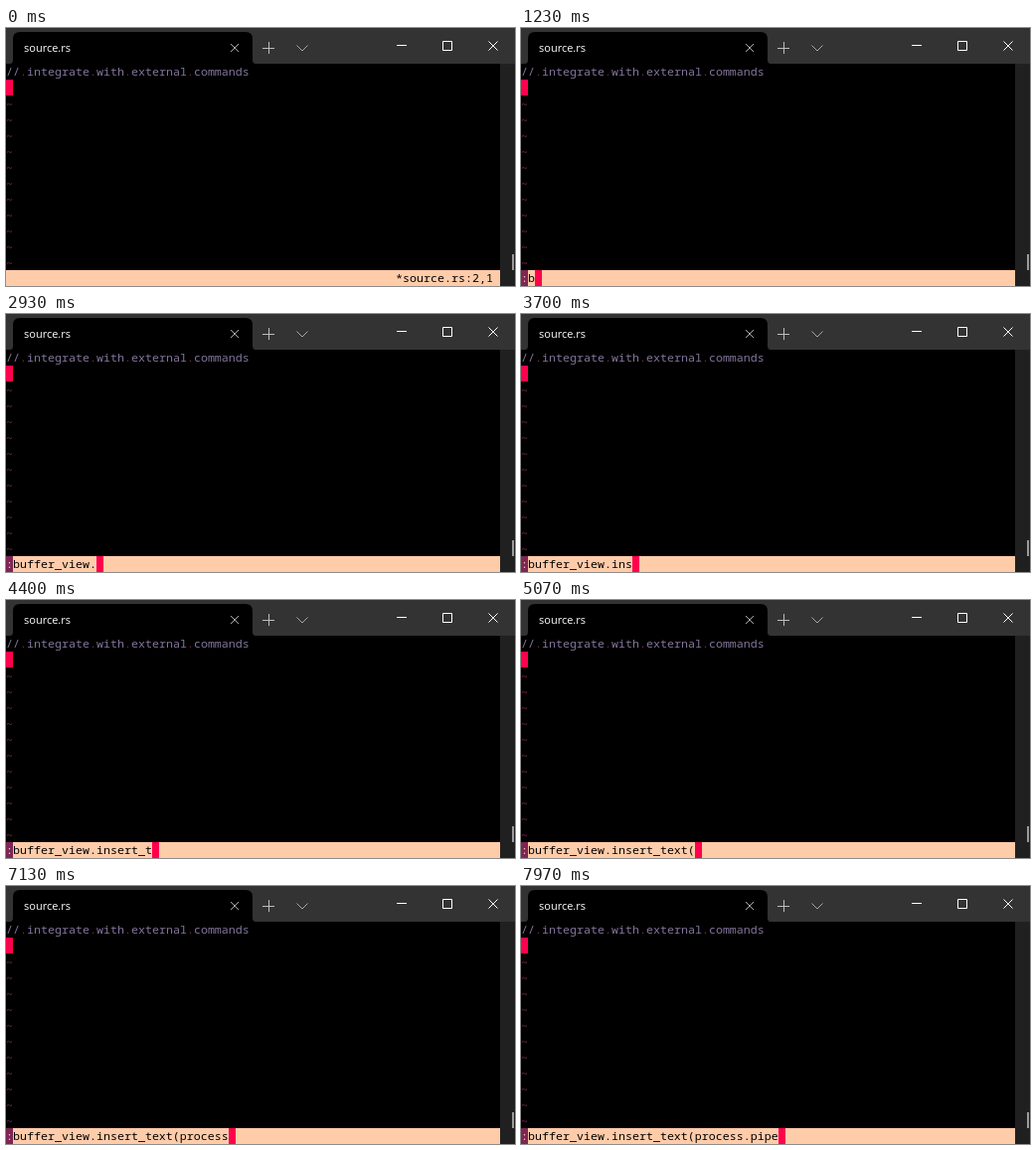
These frames come from a looping animation (512 by 260 pixels, 8000 ms). An HTML page:

```html
<!DOCTYPE html>
<html lang="en">
<head>
<meta charset="utf-8">
<title>Terminal</title>
<style>
  html, body { margin: 0; width: 100%; height: 100%; overflow: hidden; background: #000; }
  svg { display: block; }
  text { white-space: pre; }
  .mono { font: 11.667px "Noto Sans Mono", "DejaVu Sans Mono", monospace; }
  .title { font: 11px "Open Sans", "Noto Sans", sans-serif; fill: #fff; }
  .comment { fill: #83769c; }
  .dim { fill: #7e2553; }
  .peach { fill: #ffccaa; }
  .caret { fill: #ff004d; }
  .icon { fill: none; stroke-width: 1; }
</style>
</head>
<body>
<svg width="512" height="260" viewBox="0 0 512 260">
  <rect width="512" height="260"/>

  <!-- title bar -->
  <rect width="512" height="36" fill="#333"/>
  <path d="M4 36Q7 36 7 32V11Q7 4 14 4H241Q248 4 248 11V32Q248 36 251 36Z"/>
  <text class="title" x="18" y="24">source.rs</text>
  <path class="icon" stroke="#a8a8a8" d="M226 16l8 8m0-8l-8 8"/>
  <path class="icon" stroke="#bdbdbd" d="M258 20.5h12M264.5 14v12"/>
  <path class="icon" stroke="#a8a8a8" d="M292.5 17.5l5.5 5.5 5.5-5.5"/>
  <path class="icon" stroke="#fff" d="M393 17.5h10M439.5 13.5h9v9h-9zM485.5 13.5l9 9m0-9l-9 9"/>

  <!-- scroll bar -->
  <rect x="497" y="36" width="15" height="224" fill="#202020"/>
  <rect x="509" y="228" width="2" height="16" fill="#9b9b9b"/>

  <!-- editor -->
  <g class="mono">
    <text id="line" class="comment" y="48"></text>
    <g id="tildes" class="dim"></g>
    <rect class="caret" y="52" width="7" height="16"/>

    <rect class="peach" y="244" width="497" height="16"/>
    <text id="status" x="392" y="256">*source.rs:2,1</text>
    <g id="prompt">
      <rect class="dim" y="244" width="7" height="16"/>
      <text class="peach" y="256">:</text>
      <text id="command" x="7" y="256"></text>
      <rect id="caret" class="caret" y="244" width="7" height="16"/>
    </g>
  </g>
</svg>
<script>
const LOOP = 8000, CELL = 7, ROW = 16, TOP = 36, PROMPT_AT = 330;
const $ = id => document.getElementById(id);

// "<" is a backspace; each key has one press time.
const keys = 'buffer_view.insert_text("<process.pipe';
const times = [
  1230, 1300, 1600, 1770, 1930, 2130, 2330,
  2470, 2570, 2670, 2770, 2930,
  3430, 3600, 3700, 3800, 3870, 4030,
  4170, 4400, 4470, 4670, 4830, 5070,
  5670, 6130,
  6400, 6500, 6600, 6700, 6870, 7000, 7100, 7200,
  7430, 7570, 7700, 7830
];

function add(parent, tag, attrs, content) {
  const el = document.createElementNS('http://www.w3.org/2000/svg', tag);
  for (const name in attrs) el.setAttribute(name, attrs[name]);
  el.textContent = content;
  parent.append(el);
}

// Spaces show as dim dots.
for (const part of '//.integrate.with.external.commands'.split(/(\.)/))
  add($('line'), 'tspan', part === '.' ? { class: 'dim' } : {}, part);

for (let row = 2; row < 13; row++)
  add($('tildes'), 'text', { y: TOP + row * ROW + 13 }, '~');

function typedAt(t) {
  let text = '';
  times.forEach((at, i) => {
    if (t >= at) text = keys[i] === '<' ? text.slice(0, -1) : text + keys[i];
  });
  return text;
}

const start = performance.now();

function draw() {
  const t = (performance.now() - start) % LOOP;
  const open = t >= PROMPT_AT;
  const text = typedAt(t);
  $('status').style.display = open ? 'none' : '';
  $('prompt').style.display = open ? '' : 'none';
  $('command').textContent = text;
  $('caret').setAttribute('x', (text.length + 1) * CELL);
  requestAnimationFrame(draw);
}
draw();
</script>
</body>
</html>
```
